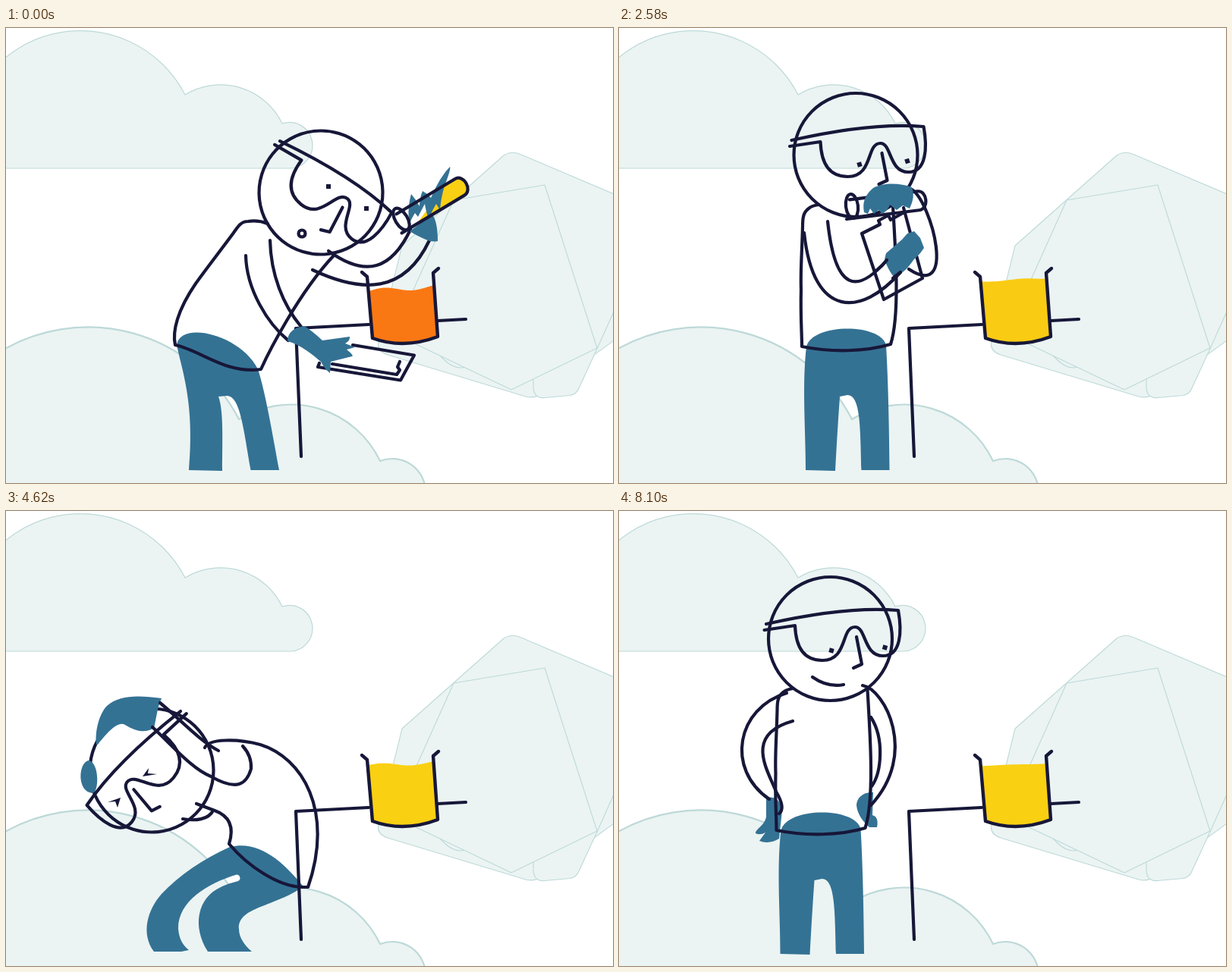
These frames come from a looping animation (800x600 px, 9120 ms). An HTML page with a canvas:

```html
<!DOCTYPE html>
<html>
<head>
<meta charset="utf-8">
<style>
html, body { margin: 0; width: 100%; height: 100%; overflow: hidden; background: #fff; }
canvas { display: block; }
</style>
</head>
<body>
<canvas id="stage" width="800" height="600"></canvas>
<script>
const c = document.getElementById('stage').getContext('2d');
const INK = '#171739', BLUE = '#347294', YELLOW = '#fad014', PALE = '#ebf4f3', EDGE = '#bdd9d8';
const LOOP = 9120, RAD = Math.PI / 180;

// ---- helpers ----
const lerp = (a, b, u) => a + (b - a) * u;
const clamp = u => Math.max(0, Math.min(1, u));
const smooth = u => (u = clamp(u), u * u * (3 - 2 * u));
const lerpAll = (a, b, u) => a.map((v, i) => lerp(v, b[i], u));

// Blend two path strings that share the same commands (no arcs).
function blend(a, b, u) {
  const to = b.match(/-?[\d.]+/g);
  let i = 0;
  return a.replace(/-?[\d.]+/g, n => lerp(+n, +to[i++], u).toFixed(2));
}

// Eased value from a list of time, value pairs.
function key(t, ...k) {
  if (t <= k[0]) return k[1];
  for (let i = 2; i < k.length; i += 2)
    if (t < k[i]) return lerp(k[i - 1], k[i + 1], smooth((t - k[i - 2]) / (k[i] - k[i - 2])));
  return k[k.length - 1];
}

function fill(d, color) {
  c.fillStyle = color;
  c.fill(new Path2D(d));
}
function line(d, width = 4.2, color = INK) {
  c.lineWidth = width;
  c.strokeStyle = color;
  c.stroke(new Path2D(d));
}
function shape(d, width) {
  fill(d, PALE);
  line(d, width, EDGE);
}
function group(x, y, angle, draw) {
  c.save();
  c.translate(x, y);
  c.rotate(angle * RAD);
  draw();
  c.restore();
}
function ring(x, y, rx, ry = rx) {
  c.lineWidth = 4.2;
  c.strokeStyle = INK;
  c.beginPath();
  c.ellipse(x, y, rx, ry, 0, 0, 7);
  c.stroke();
}
function eye(x, y, angle) {
  group(x, y, angle, () => fill('M-3-3H3V3H-3Z', INK));
}

// ---- scenery ----
function backdrop() {
  shape('M-60 185L-57 159A155 155 0 0 1 236 88A90 90 0 0 1 364 126A30.3 30.3 0 1 1 375 185Z', 1.2);
  shape('M-10 428A224 224 0 0 1 307 516A130 130 0 0 1 493 571A44 44 0 0 1 553 613H-10Z', 2.2);
  shape('M656 168Q667 161 679 167L830 231V391L705 482Q697 489 685 486L503 431Q488 426 491 413L522 287Z', 1.1);
  shape('M540 400L578 438Q592 451 605 447L695 440V474Q696 489 710 487.5L743 484.5Q752 483 755 475L779 423L805 365', 1.1);
  shape('M590 227L710 207L779 422L666 477L511 403Z', 1.1);
}

function table() {
  line('M389 565L382 396L478 391M569 386L606 384');
}

function beaker(t) {
  const still = Math.min(t, 6510), phase = still / 580 * 2 * Math.PI;
  const splash = Math.exp(-(((still - 3900) / 140) ** 2));
  const level = key(still, 0, 347, 1740, 336, 2580, 334, 3600, 335, 3900, 343, 4300, 335.5, 6510, 336);
  const amp = key(still, 0, 3, 1740, 3, 2580, 1, 3600, 4, 3900, 0.5, 4300, 2.2, 4620, 2.2, 6510, 0.3);
  const slope = key(still, 0, 6, 2580, 4, 6510, 3) + 15 * splash;
  let d = 'M483 409';
  for (let i = 0; i <= 30; i++) {
    const u = i / 30, x = 478 + 86 * u, off = (x - 535) / (x < 535 ? 20 : 13);
    const y = level - slope * u - amp * Math.sin(u * 7 - phase) - 28 * splash * Math.exp(-off * off);
    d += `L${x} ${y.toFixed(2)}`;
  }
  const green = Math.round(lerp(120, 208, clamp(t / 2750)));
  fill(d + 'L569 407Q524 424 483 409Z', `rgb(250,${green},19)`);
  line('M469 322L476 328L483 409Q524 424 569 407L563 323L570 317', 4.4);
}

// ---- props ----
function tube([x, y, angle], drain, held) {
  group(x, y, angle, () => {
    if (drain < 1)
      fill(blend('M14 16L72 -9H88C101 -9 101 16 87 16Z', 'M97 8L97 8H97C98 8 98 8 97 8Z', drain), YELLOW);
  });
  if (held) held();
  group(x, y, angle, () => {
    line('M-2-9H88C101-9 101 16 87 16H-9');
    ring(0, 0, 8, 16);
  });
}

function goggles() {
  line('M-87-11.5L-46.5-17.5C-45.5 11.5-34.5 28.5-10.5 28.5C23.5 28.5 13.5-15.5 32.5-15.5'
    + 'C47.5-15.5 43.5 22.5 69.5 22.5C93.5 22.5 94.5-10.5 89.5-37.5Q21.5-43.5-84.5-19.5');
  line('M34.5-2.5L41.5 33.5L30.5 38.5');
}
function head(x, y, angle, flip = 1) {
  group(x, y, angle, () => {
    c.scale(flip, 1);
    ring(0, 0, 81.5);
    goggles();
  });
}

// ---- poses ----
const pour = {
  torso: 'M345 258C335 254 326 254 319 255C309 255 305 263 300 270C280 297 262 320 250 337C226 372 219 400 223 418C257 425 290 457 336 450C345 430 385 350 432 300',
  legs: 'M225 418C232 452 249 495 241 583L285 584C285 545 287 505 280 486L291 485C309 485 313 530 322.5 583H360C352 540 342 480 332 450C310 405 230 385 225 418Z',
  arms: 'M316 300C317 345 345 390 372 412M348 280C349 325 365 365 389 394',
  reach: 'M425 294C475 330 508 318 533 266M404 319C470 350 525 350 558 280',
  head: [415, 217, 38.5]
};
const stand = {
  torso: 'M263 233C257 234 253 235 250 238C243 243 242 250 242 262C241 300 239 320 240 345C239 380 241 400 241 420C280 428 325 427 358 417C370 380 365 300 361 235',
  legs: 'M247 420C241 470 246 530 246 583L285 584C287 545 289 515 291 486L301 484C319 484 318 530 319.5 583H356.5C356 530 355 470 352 418C345 389 255 389 247 420Z',
  arms: 'M244 270C256 385 320 380 371 322M275 255C285 350 315 350 353 306',
  reach: 'M386 213C412 230 446 360 382 318M386 213C412 230 446 360 382 318',
  head: [312, 167.5, 0]
};
const TUBE = { start: [521, 252, -31], end: [529, 265, -47], up: [307, 235, -7], flung: [636, 311, 20] };
const fingers = [
  'M532 258C529 243 531 230 534 219Q541 227 545 235Q545 224 549 215Q555 218 560 224Q572 196 585 183Q587 185 578 208Q573 225 572 240L567 232Q562 240 557 252Q553 240 552 232Q545 245 543 249L539 244Q534 252 532 258Z',
  'M531 252C529 243 531 235 534 228Q540 233 543 239Q545 232 549 229Q551 230 554 234Q560 205 574 183Q576 187 573 205Q568 225 567 242L561 236Q556 246 550 256Q547 247 545 242Q541 248 540 250L537 247Q534 250 531 252Z'
];
const palm = [
  'M532 268L562 246Q569 256 569 281Q560 283 551 278Q538 272 532 268Z',
  'M535 274L562 249Q570 262 575 283Q562 284 552 281Q540 277 535 274Z'
];

// Pouring, then straightening up to take notes.
function work(t) {
  const p = smooth(t / 1800), u = smooth((t - 1890) / 420), up = u > 0.5;
  const tilt = smooth(t / 930) * (1 - u);
  const mixed = part => blend(pour[part], stand[part], u);
  const lean = draw => group(280, 440, tilt, () => { c.translate(-280, -440); draw(); });

  fill(mixed('legs'), BLUE);
  lean(() => {
    line(mixed('torso'));
    const [x, y, angle] = lerpAll(pour.head, stand.head, u);
    head(x, y, angle + 1.8 * tilt);
  });
  const look = lerpAll(lerpAll([425, 209, 475, 238], [427, 226, 477, 256], smooth(t / 930)), [317, 180, 380, 175.5], u);
  const turn = lerp(0, -18, u);
  eye(look[0], look[1], turn);
  eye(look[2], look[3], turn);
  if (!up) ring(390, 271 - 3 * tilt, 4.5);

  table();
  lean(() => line(mixed('arms') + mixed('reach')));

  if (up) group(115 * (1 - u), 142 * (1 - u), 0, () => {
    line('M344 259L320 271L349 358L400 330L375 237M344 259L342 254L355 247L358 253L376 243');
    fill('M350 305L352 297L373 279L380 271L389 268L397 277L402 290L397 297L388 306C380 318 372 325 362 328Q354 318 350 305Z', BLUE);
    line('M340 319Q347 314 353 306M361 330L371 322');
  });
  else group(-115 * u, -142 * u, 0, () => {
    line('M457 418L538 431.5L520 464.5L411 447L413 442M430 443L515 457L519 451L516 447L519 440');
    fill('M371 413C371 403 378 395 393 393Q402 398 417 412L453 407Q454 412 447 416L460 421L449 424Q459 432 456 433L428 440L427 455Q420 450 415 440C405 432 390 418 371 413Z', BLUE);
  });

  const at = lerpAll(lerpAll(TUBE.start, TUBE.end, p), TUBE.up, u);
  const follow = (home, draw) => group(at[0] - home[0], at[1] - home[1], 0, draw);
  tube(at, clamp(t / 1400), up ? null : () => follow(lerpAll(TUBE.start, TUBE.end, p), () => {
    fill(blend(fingers[0], fingers[1], p), BLUE);
    fill(blend(palm[0], palm[1], p), BLUE);
  }));
  if (up) follow(TUBE.up, () =>
    fill('M323 243Q319 224 335 211C350 203 372 205 386 210Q391 222 383 238L374 234L366 240L357 233Q355 240 347 245L342 240L336 245L331 238L328 245Z', BLUE));
}

// Thrown back by the blast.
function blast(t) {
  const k = smooth((t - 3900) / 330), jump = 1 - smooth((t - 3760) / 120);
  group(50 * jump - 56 * k, 60 * jump + 27 * k, 0, () => {
    fill('M248 351C285 335 340 312 360 303C400 290 440 310 465 340C490 375 510 420 520 460L487 478C470 410 440 350 400 345C370 340 330 360 275 374C250 385 243 400 246 420C250 450 285 490 316 516L281 540C250 520 195 470 196 420C198 385 220 360 248 351Z', BLUE);
    line('M203 192C190 200 190 215 193 235C200 270 230 320 248 351C290 342 330 330 370 315Q386 308 386 299C382 285 348 244 325 200L311 173');
    line('M312 514C325 512 328 530 322 541C318 548 305 547 308 545Q295 560 285 563C260 567 225 565 223 553C226 535 290 516 312 514ZM484 463C486 447 505 446 515 454C528 465 532 490 530 505C525 530 515 536 508 534C495 530 480 490 484 463Z');
    ring(250.5, 123, 81.5);
    line('M166 134C180 112 215 50 285 45C298 56 302 72 290 84C275 89 252 72 237 78C226 85 238 100 232 115C225 134 208 136 195 134C182 130 174 130 173 139');
    line('M237 81L253 88L246 102');
    line('M233 154C232 140 250 115 270 103C285 93 305 87 313 92C322 99 315 114 300 120C285 126 272 127 272 140C272 152 258 164 246 166Q234 168 233 154Z');
    eye(282, 44, 10);
    eye(205, 122, 10);
    fill('M61 122Q64 95 62 80Q57 55 58 42Q62 38 65 55Q68 68 71 70Q73 72 72 55Q72 43 76 43Q80 50 82 68Q83 50 88 40Q91 42 91 60Q93 75 96 79Q106 75 118 71Q120 74 108 84Q100 95 97 118Q80 128 61 122Z', BLUE);
    line('M195 254C95 255 40 208 62 113M198 214C120 218 75 185 91 116');
    line('M304-75V-12C320 35 345 80 345 103C346 115 332 140 318 162M336-75V-12C355 35 375 75 375 110C375 125 345 175 326 198');
  });
  table();
}

function sparks(t) {
  const age = (t - 3750) / 150;
  if (age < 3) tube(lerpAll(TUBE.up, TUBE.flung, age), 1);
  const k = 0.3 + 0.7 * Math.sqrt(age);
  c.save();
  c.globalAlpha = 0.6 * clamp(age * 2) * clamp((4.2 - age) / 2.6);
  c.translate(520, 330);
  c.scale(k, k);
  c.translate(-520, -330);
  fill('M607 155L573 181L586 183L562 199L575 202L558 226L596 201L582 199L600 184L588 181ZM632 177L612 197L620 199L608 213L634 202Z', YELLOW);
  line('M558 131L572 98M564 133L579 98M553 108L588 107M549 122L583 121', 3.2, YELLOW);
  line('M435 180L438 165L456 174L447 182L454 190M458 195V195.2', 3.4, YELLOW);
  c.restore();
}

function drop(t) {
  if (t < 3550 || t > 4015) return;
  const dy = -65 + (t < 3700 ? 0.0073 : 0.0016) * (t - 3700) ** 2;
  group(0, dy, 0, () => fill('M493 235Q497 231 502 234L499.5 322Q497.5 329 496 322Z', YELLOW));
}

// Crouched with hands over the head.
function crouch(t) {
  const off = key(t, 4620, 5, 5580, 0), enter = 1 - smooth((t - 4230) / 200);
  group(off + 45 * enter, off - 30 * enter, 0, () => {
    fill('M290 438C330 428 362 460 387 490C350 517 300 517 302 546C302 558 310 568 319 576L261 576C240 543 247 505 278 491Q288 486 301 483A4.5 4.5 0 0 0 299 474.5C260 486 222 510 222 545Q223 564 236 574L226 576H190C172 552 182 520 200 500Q235 463 290 438Z', BLUE);
    line('M257 307C262 295 300 295 330 303C385 320 428 390 393 491H385C355 490 315 465 289 434C295 415 292 398 270 390L246 381M228 401C245 404 262 402 268 390');
    head(187, 337, -51, -1);
    fill('M129 379L146 373L142 386L139 378Z', INK);
    if (t < 5760) fill('M175 345L183 334L182 341L194 342Z', INK);
    else eye(key(t, 5760, 190, 6480, 201, 6780, 207.5), key(t, 5760, 339, 6480, 337), 15);
    fill('M114 303C112 285 118 262 128 252C145 237 170 238 200 242C194 255 193 270 190 281C178 289 165 285 152 277C142 271 128 288 116 303Z', BLUE);
    fill('M104 324C118 326 118 366 109 367C88 366 90 326 104 324Z', BLUE);
    line('M198 248C225 270 250 298 275 311M188 280C215 305 240 335 265 345C300 365 312 355 318 335Q319 318 307 305');
  });
  table();
}

// Springs up, hands on hips, smiling.
function proud(t) {
  const s = key(t, 7920, 0.85, 7980, 1.11, 8040, 0.97, 8100, 1);
  c.save();
  c.translate(0, 588 * (1 - s));
  c.scale(1, s);
  fill('M194 378Q212 375 215 395L211 432Q198 440 185 435L193 424Q186 428 180 425C180 419 192 415 194 403Z', BLUE);
  fill('M335 371C320 370 313 380 313 388C314 400 322 410 330 417H340Q342 408 338 403L334 401Z', BLUE);
  group(-33.5, 1, 0, () => {
    fill(stand.legs, BLUE);
    line(stand.torso);
    head(...stand.head);
  });
  eye(280, 184, 15);
  eye(350.5, 180, 15);
  line('M255 219Q275 233 296 229');
  line('M221 240C155 260 140 340 198 380M229 277C165 295 195 340 207 370Q220 392 211 399');
  line('M321 230C350 235 395 320 332 388M332 272C350 300 346 345 333 363');
  c.restore();
  table();
}

function draw(now) {
  const t = now % LOOP;
  c.clearRect(0, 0, 800, 600);
  c.lineCap = c.lineJoin = 'round';
  backdrop();
  (t < 3765 ? work : t < 4230 ? blast : t < 7915 ? crouch : proud)(t);
  if (t >= 3765) sparks(t);
  drop(t);
  beaker(t);
}

const begin = performance.now();
function tick() {
  draw(performance.now() - begin);
  requestAnimationFrame(tick);
}
tick();
</script>
</body>
</html>
```
